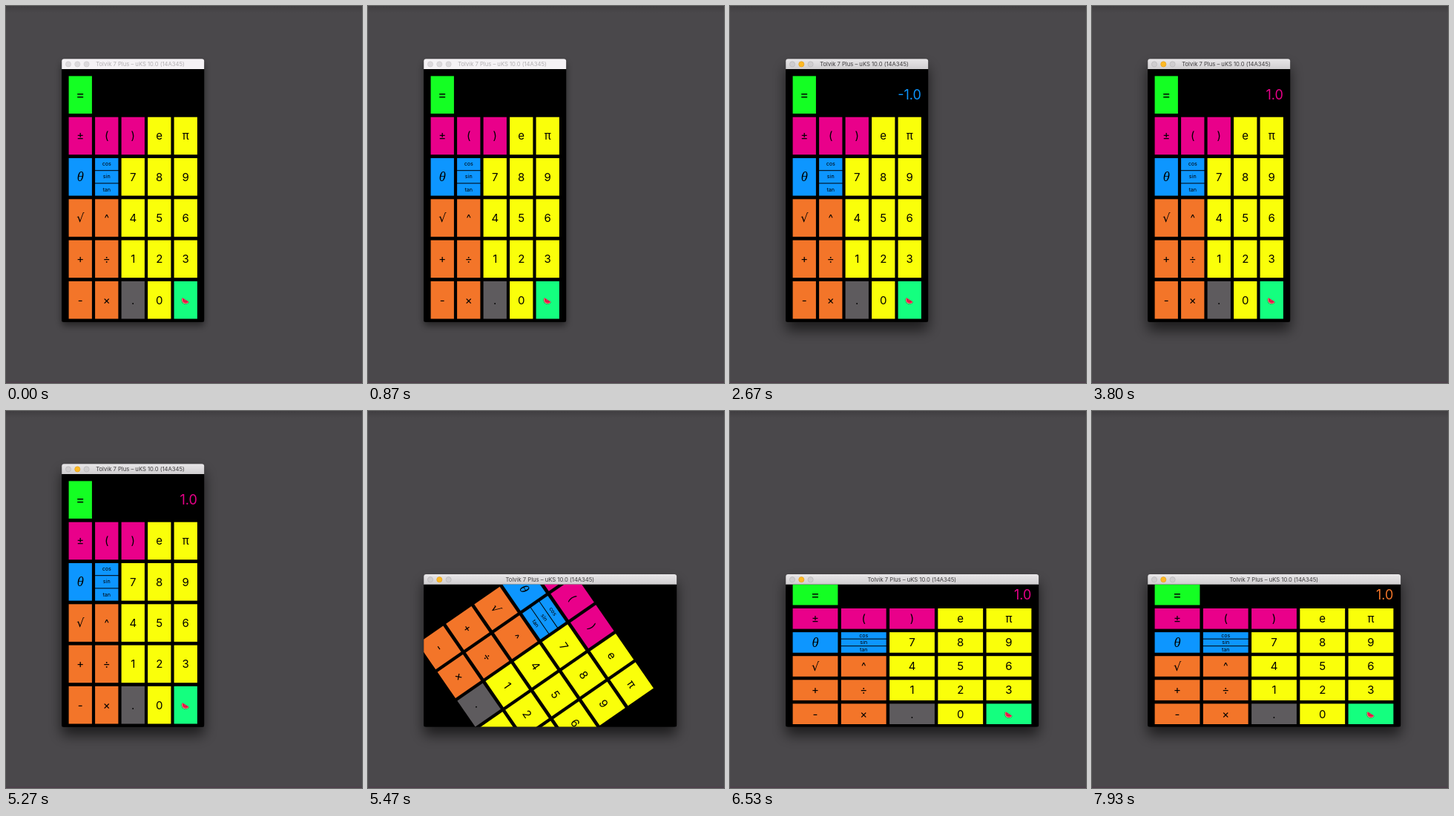
An HTML page for the animation above (8000 ms loop, 480 px wide and 508 px high).

```html
<!DOCTYPE html>
<html lang="en">
<head>
<meta charset="utf-8">
<title>Calculator</title>
<style>
  html, body { margin: 0; width: 100%; height: 100%; overflow: hidden; background: #4a484b; }
  svg { display: block; width: 100vw; height: 100vh; }
  text { font-family: Inter, Roboto, sans-serif; text-anchor: middle; }
</style>
</head>
<body>
<svg id="stage" viewBox="0 0 480 508">
  <defs>
    <linearGradient id="active" x2="0" y2="1">
      <stop stop-color="#e9e7e9"/><stop offset="1" stop-color="#d0ced0"/>
    </linearGradient>
    <linearGradient id="topShade" x2="0" y2="1">
      <stop stop-color="#403e41"/><stop offset="1" stop-color="#4a484b"/>
    </linearGradient>
    <filter id="blur" x="-30%" y="-30%" width="160%" height="160%">
      <feGaussianBlur id="blurAmount" stdDeviation="9"/>
    </filter>
    <clipPath id="screen"><rect id="screenRect"/></clipPath>
  </defs>
  <rect width="480" height="508" fill="#4a484b"/>
  <rect width="480" height="9" fill="url(#topShade)"/>
  <rect y="506.5" width="480" height="1.5" fill="#4d3e4a"/>
  <rect id="shadow" rx="4" filter="url(#blur)"/>
  <rect id="frame" rx="3"/>
  <path id="bar"/>
  <g id="lights"></g>
  <text id="title" font-size="7.65">Tolvik 7 Plus – uKS 10.0 (14A345)</text>
  <g clip-path="url(#screen)">
    <rect id="back" fill="#000"/>
    <g id="content"></g>
  </g>
</svg>
<script>
const LOOP = 8000;
const ACTIVATE = 1200, FLIP = 5330, TURN = 5298, TURN_MS = 400;
const PINK = '#e9008a', YELLOW = '#faff0a', BLUE = '#0d96ff', ORANGE = '#f37529';

// Display value, colour and size from each time on.
const VALUES = [
  [0, '', YELLOW, 18],
  [1330, '3.14159265358979', YELLOW, 14.7],
  [2600, '-1.0', BLUE, 18],
  [3470, '1.0', PINK, 18],
  [7270, '1.0', ORANGE, 18]
];

const ROWS = [['='], [...'±()eπ'], ['θ', 'trig', ...'789'],
  [...'√^456'], [...'+÷123'], [...'-×.0', 'melon']];
const SIZES = { '=': 18, '√': 16, '^': 14, '-': 15, 'θ': 16 };

// Grid geometry: origin, pitch and key size for each orientation.
const TALL = { w: 192, h: 341, x: 9.4, y: 9.4, px: 35.5, py: 55.3, kw: 31.3, kh: 50.6 };
const WIDE = { w: 341, h: 192, x: 9.4, y: 0.1, px: 65.25, py: 32.1, kw: 60.8, kh: 27.6 };

const $ = id => document.getElementById(id);

function set(el, attrs) {
  for (const k in attrs) el.setAttribute(k, attrs[k]);
  return el;
}

function add(parent, tag, attrs, label) {
  const el = document.createElementNS('http://www.w3.org/2000/svg', tag);
  if (label) el.textContent = label;
  return parent.appendChild(set(el, attrs));
}

function colour(label, row, col) {
  if (label === '=') return '#14ff23';
  if (label === 'melon') return '#14ff7f';
  if (label === '.') return '#5e5b5e';
  if (row === 1 && col < 3) return PINK;
  if (col > 1) return YELLOW;
  return row === 2 ? BLUE : ORANGE;
}

function addMelon(parent) {
  const g = add(parent, 'g', {});
  add(g, 'path', { d: 'M-5.7 0A5.7 5.7 0 0 0 5.7 0Z', fill: '#238a35' });
  add(g, 'path', { d: 'M-5.1 0A5 5 0 0 0 5.1 0Z', fill: '#e6f0b4' });
  add(g, 'path', { d: 'M-4.9 -.4A4.5 4.5 0 0 0 4.9 -.4Z', fill: '#f0204f' });
  for (const [cx, cy] of [[-2, 1], [0.3, 2], [2, 0.8]]) {
    add(g, 'circle', { cx, cy, r: 0.4, fill: '#4b1018' });
  }
  return g;
}

const content = $('content');
const keys = [];
ROWS.forEach((labels, row) => labels.forEach((label, col) => {
  const parts = label === 'trig' ? ['cos', 'sin', 'tan'] : [label];
  parts.forEach((name, i) => {
    const rect = add(content, 'rect', { fill: colour(label, row, col) });
    const size = parts.length > 1 ? 7.2 : SIZES[name] || 15;
    const text = name === 'melon' ? null : add(content, 'text', { 'font-size': size }, name);
    if (name === 'θ') text.style.cssText = 'font-family:"Noto Serif",serif;font-style:italic';
    if (name === '√') text.style.cssText = 'font-family:"DejaVu Sans",sans-serif';
    const melon = text ? null : addMelon(content);
    keys.push({ rect, text, melon, size, row, col, i, n: parts.length });
  });
}));
const value = add(content, 'text', { style: 'text-anchor:end' });
const lights = [84, 96.3, 108.6].map(cx => add($('lights'), 'circle', { cx, r: 3.6, 'stroke-width': 0.6 }));

// Cubic ease-in-out with control points (.42, 0) and (.58, 1).
function ease(x) {
  if (x <= 0 || x >= 1) return x <= 0 ? 0 : 1;
  let lo = 0, hi = 1, u = x;
  for (let k = 0; k < 20; k++) {
    u = (lo + hi) / 2;
    const at = 3 * u * (1 - u) * (0.42 * (1 - u) + 0.58 * u) + u ** 3;
    if (at < x) lo = u; else hi = u;
  }
  return u * u * (3 - 2 * u);
}

function layout(p) {
  const g = {};
  for (const k in TALL) g[k] = TALL[k] + (WIDE[k] - TALL[k]) * p;
  return g;
}

function drawWindow(wide, on) {
  const x = 75.2, top = wide ? 220 : 71.2, y = top + 13.8;
  const { w, h } = wide ? WIDE : TALL;
  const box = { x, y, width: w, height: h - 0.3 };
  set($('frame'), { x, y: top, width: w, height: h + 13.5, fill: '#000' });
  set($('back'), box);
  set($('screenRect'), { ...box, rx: 1.5 });
  set($('bar'), {
    d: `M${x} ${y}V${top + 3}q0-3 3-3h${w - 6}q3 0 3 3V${y}Z`,
    fill: on ? 'url(#active)' : '#f5f2f5'
  });
  set($('shadow'), {
    x, y: top + (on ? 11 : 5), width: w, height: h + 13.5,
    fill: on ? 'rgba(0,0,0,.62)' : 'rgba(0,0,0,.5)'
  });
  set($('blurAmount'), { stdDeviation: on ? 9 : 5 });
  set($('title'), {
    x: wide ? 245.3 : 181, y: top + 10, fill: on ? '#3c3a3c' : '#b0adb0'
  });
  lights.forEach((c, i) => {
    const lit = on && i === 1;
    set(c, {
      cy: top + 7.2,
      fill: lit ? '#fdb924' : on ? '#cfcdcf' : '#dcd9dc',
      stroke: lit ? '#dd9b1d' : on ? '#b4b2b4' : '#cbc8cb'
    });
  });
  return { cx: x + w / 2, cy: y + h / 2 };
}

function draw(t) {
  const wide = t >= FLIP;
  const p = wide ? ease((t - TURN) / TURN_MS) : 0;
  const angle = wide ? 90 * (1 - p) : 0;
  const g = layout(p);
  const { cx, cy } = drawWindow(wide, t >= ACTIVATE);
  set(content, { transform: `translate(${cx} ${cy}) rotate(${angle}) translate(${-g.w / 2} ${-g.h / 2})` });

  for (const k of keys) {
    const h = (g.kh - (k.n - 1)) / k.n;
    const x = g.x + k.col * g.px;
    const y = g.y + k.row * g.py + k.i * (h + 1);
    const mx = x + g.kw / 2, my = y + h / 2;
    set(k.rect, { x, y, width: g.kw, height: h });
    if (k.text) set(k.text, { x: mx, y: my + k.size * (k.n > 1 ? 0.3 : 0.36) });
    else set(k.melon, { transform: `translate(${mx - 0.2} ${my}) rotate(32)` });
  }

  const [, label, fill, size] = VALUES.filter(v => v[0] <= t).pop();
  value.textContent = wide && p < 1 ? '' : label;
  set(value, {
    x: g.x + 4 * g.px + g.kw, y: g.y + g.kh / 2 + size * 0.36,
    fill, 'font-size': size
  });
}

const start = performance.now();
function tick() {
  draw((performance.now() - start) % LOOP);
  requestAnimationFrame(tick);
}
tick();
</script>
</body>
</html>
```
